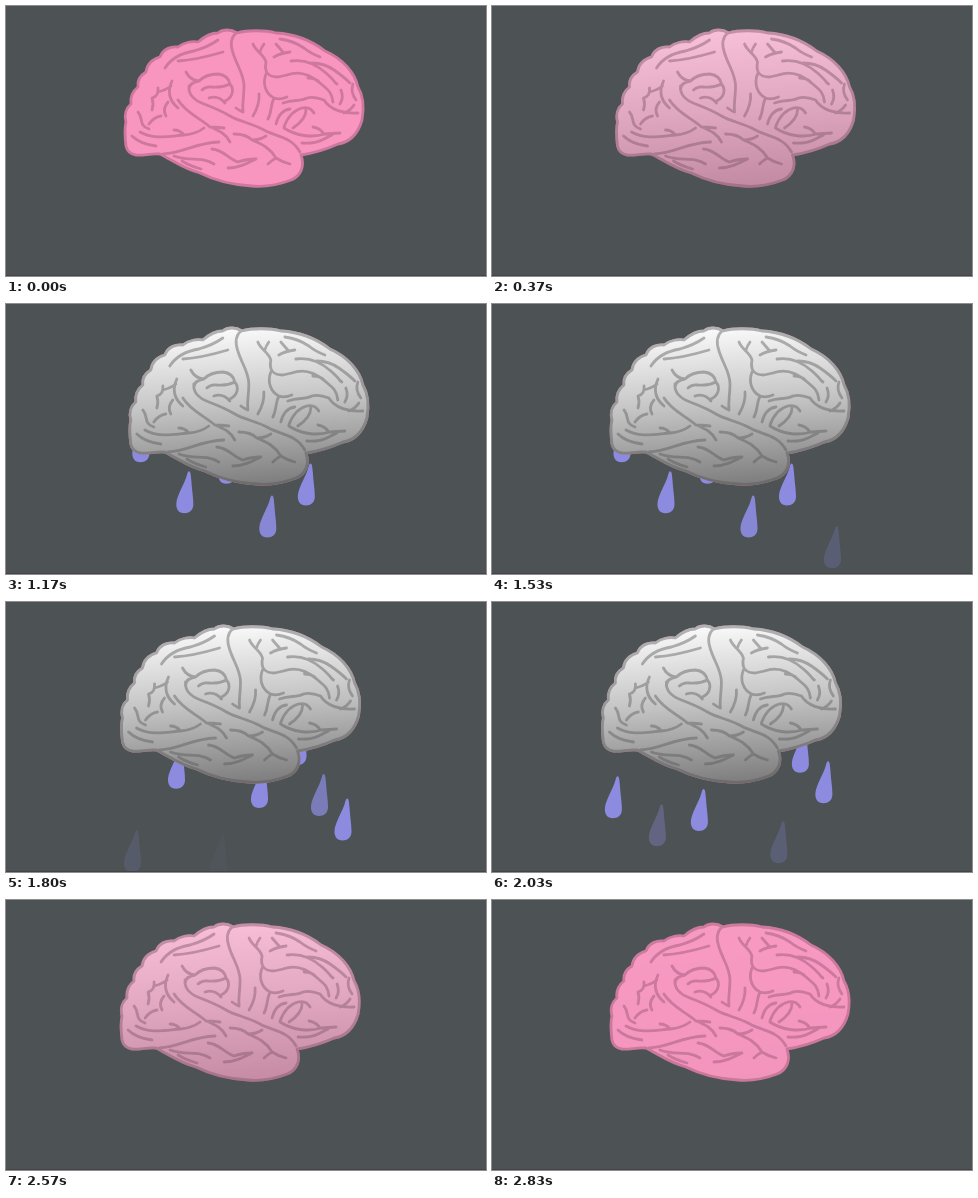
Write an HTML page that moves like this. It is 480x270 px and loops after 2860 ms.

```html
<!DOCTYPE html>
<html>
<head>
<meta charset="utf-8">
<title>Sweating brain</title>
<style>
html, body { margin: 0; width: 100%; height: 100%; overflow: hidden; background: #4d5255; }
svg { display: block; width: 100%; height: 100%; }
#brain { stroke-width: 2.8; stroke-linecap: round; stroke-linejoin: round; }
.folds { fill: none; }
.pink { fill: #f896c0; stroke: #cf789f; }
.grey { fill: url(#shade); stroke: url(#edge); }
</style>
</head>
<body>
<svg viewBox="0 0 480 270">
  <defs>
    <linearGradient id="shade" gradientUnits="userSpaceOnUse" x1="225" y1="24" x2="237" y2="181">
      <stop offset="0" stop-color="#fafafa"/>
      <stop offset=".5" stop-color="#c2c2c2"/>
      <stop offset="1" stop-color="#7e7e7e"/>
    </linearGradient>
    <linearGradient id="edge" gradientUnits="userSpaceOnUse" x1="225" y1="24" x2="237" y2="181">
      <stop offset="0" stop-color="#b2b2b2"/>
      <stop offset=".5" stop-color="#959595"/>
      <stop offset="1" stop-color="#6c6c6c"/>
    </linearGradient>
    <path id="drop" d="M4-42C6-42 6-38 6.5-33C7-24 8.5-16 8.5-9C8.5-3 4.5 0-.5 0C-6 0-9-4-8.5-10C-8-18 0-30 2-38Q3-42 4-42Z"/>
    <g id="brain">
      <path d="M120 140C119 132 118 124 120 116C118 109 120 102 125 98C124 91 127 85 132 81
        C131 74 135 69 140 66C141 58 147 53 154 51C157 43 165 40 172 41C178 36 187 35 192 36
        C199 30 206 27 212 27C217 23 225 23 231 27C241 24 259 24 270 27C289 28 306 35 319 45
        C337 53 349 67 352 81C358 91 358 103 356 114C352 128 344 136 332 138C321 143 308 147 295 149
        C299 160 295 170 285 174C272 179 258 181 246 180C226 179 208 174 194 167
        C178 163 166 154 154 148C145 147 137 150 130 149C124 148 121 145 120 140Z"/>
      <path class="folds" d="M230 27C223 33 225 41 227 47C231 60 238 68 238 80S236 96 237 106M237 106Q234 105 230 102
        M247 38C250 46 258 48 260 56C258 66 262 71 272 71L281 69M258 38Q255 42 254 46
        M268 51Q275 47 284 46M270 38Q276 45 278 47M274 33Q288 35 298 42M298 42Q304 47 314 51
        M285 55C299 53 310 58 320 67S328 76 331 78M306 57Q318 57 328 64T344 77
        M281 69C294 64 306 70 314 77S326 86 327 96M314 77Q310 72 302 72
        M260 68C256 78 260 88 268 92Q274 94 281 91M268 92C264 100 266 106 262 113M253 88Q254 98 247 110
        M277 97C288 93 294 96 301 92Q308 90 318 94C324 104 338 108 352 107M338 107Q345 104 348 99
        M270 118C272 110 276 104 284 103M278 121C282 110 288 104 296 102M287 122C293 118 300 112 300 104
        M296 102Q304 100 308 107M335 84Q338 92 334 98M347 78Q344 86 350 94
        M278 122C290 130 306 132 319 128L334 127M318 128Q314 122 307 121M296 137Q308 138 316 134T326 129
        M183 80C182 90 190 95 198 98S214 104 224 110S246 117 258 124S285 130 294 146
        M159 62C166 51 176 47 188 45M172 55Q190 54 217 46M188 45Q202 41 212 34
        M180 66Q184 74 193 75Q200 68 212 68Q222 69 224 78C229 84 226 92 219 95
        M193 75C185 76 183 80 183 84M224 78Q216 82 206 81M203 92Q212 89 219 97M206 81Q200 80 196 84
        M166 75C160 88 166 97 172 102M146 92Q153 90 152 82M152 86Q160 84 165 80M146 92Q148 98 146 104
        M162 96Q156 103 160 110M132 106C138 113 132 119 143 123M143 118Q148 111 155 110
        M134 126C148 134 164 130 178 129Q190 128 198 122M178 129Q174 124 168 124M126 130Q134 138 150 140
        M172 94C180 107 194 112 204 121C214 125 220 128 224 136M204 121Q210 121 218 122
        M157 148C178 147 188 137 213 136M168 150C184 156 196 150 208 158M176 155Q184 160 195 163
        M206 143C218 144 222 153 232 156M232 156Q240 153 250 153M222 162C232 162 240 158 250 153
        M228 128Q240 128 246 134C256 138 264 142 270 152Q276 156 284 158M246 134Q254 134 260 130M270 152Q266 154 262 158"/>
    </g>
  </defs>
  <g id="body">
    <g id="drops" fill="#8c8be0"></g>
    <use href="#brain" class="pink"/>
    <use href="#brain" class="grey" id="grey"/>
  </g>
  <path d="M0 269.5H480" stroke="#454249"/>
</svg>
<script>
const LOOP = 2860, CYCLE = 360, CYCLES = 3;
const $ = id => document.getElementById(id);
const clamp = v => Math.max(0, Math.min(1, v));

// Sway: time, horizontal offset
const sway = [[0, 0], [740, 11], [1540, 0], [2190, -10], [LOOP, 0]];

// Drops: x, first start time, starting bottom edge, fall distance
const drops = [
  [130, 1098, 128, 149], [174, 986, 163, 90], [216, 1087, 150, 127], [257, 911, 154, 110],
  [295.5, 976, 118, 154], [317, 1159, 120, 120], [340.5, 1195, 168, 103]
].map(([x, start, y, fall]) => {
  const el = document.createElementNS("http://www.w3.org/2000/svg", "use");
  el.setAttribute("href", "#drop");
  $("drops").append(el);
  return { el, x, start, y, fall };
});

function swayAt(t) {
  const i = sway.findIndex(k => t < k[0]);
  const [t0, a] = sway[i - 1], [t1, b] = sway[i];
  return a + (b - a) * (1 - Math.cos(Math.PI * (t - t0) / (t1 - t0))) / 2;
}

function draw(now) {
  const t = now % LOOP;
  $("body").setAttribute("transform", `translate(${swayAt(t)} 0)`);
  $("grey").setAttribute("opacity", clamp(Math.min(t / 860, (LOOP - t) / 715)));
  for (const { el, x, start, y, fall } of drops) {
    const n = (t - start) / CYCLE, p = n - Math.floor(n);
    const active = n >= 0 && n < CYCLES;
    el.setAttribute("opacity", active ? clamp((1 - p) / .3) : 0);
    el.setAttribute("transform", `translate(${x} ${y + fall * p})`);
  }
}

const begin = performance.now();
function tick() {
  draw(performance.now() - begin);
  requestAnimationFrame(tick);
}
tick();
</script>
</body>
</html>
```
